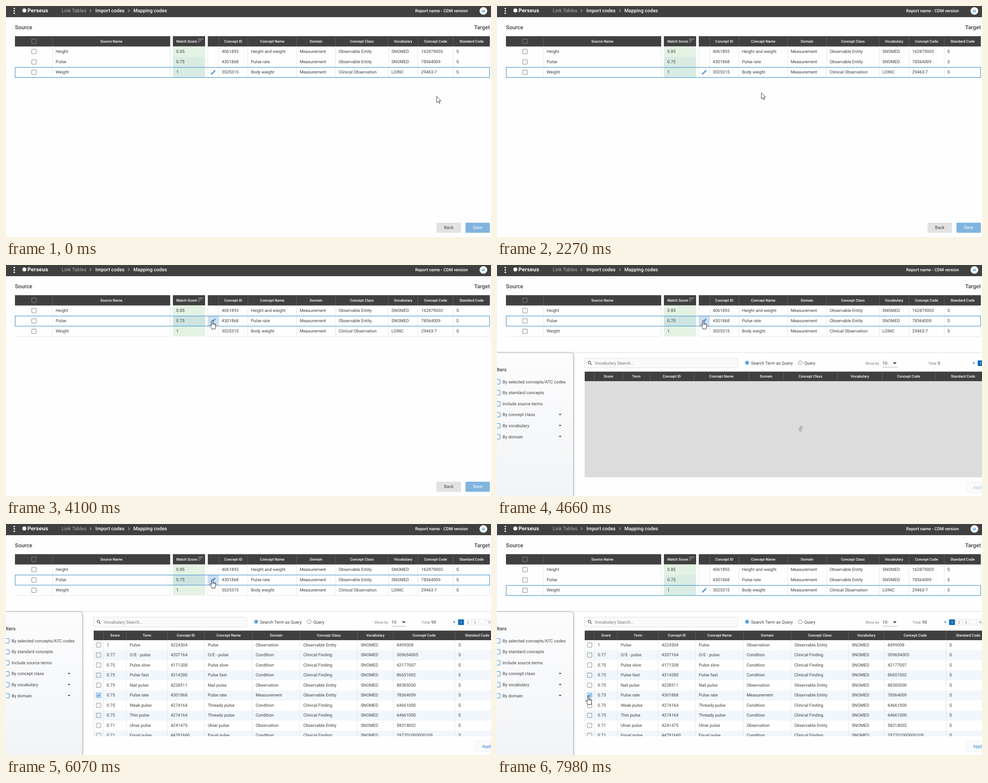
Write an HTML page that moves like this. It is 1084 by 517 pixels and loops after 8 s.

```html
<!DOCTYPE html>
<html lang="en">
<head>
<meta charset="utf-8">
<title>Mapping codes</title>
<style>
html, body { margin: 0; width: 100%; height: 100%; overflow: hidden; background: #fefefe; }
svg { display: block; width: 1084px; height: 517px; }
text { font: 9.58px Roboto, sans-serif; fill: #404040; text-rendering: geometricPrecision; }
.head { font-size: 8.2px; font-weight: 500; fill: #fff; text-anchor: middle; }
.crumb { font-size: 10.95px; font-weight: 500; fill: #fff; }
.title { font-size: 12.3px; font-weight: 500; }
.small { font-size: 8.2px; fill: #777; }
.page { font-size: 8.2px; fill: #777; text-anchor: middle; }
.mid { text-anchor: middle; }
.end { text-anchor: end; }
</style>
</head>
<body>
<script>
const DARK = '#404040', BLUE = '#1976c5', ZEBRA = '#f1f7fc';

const text = (x, y, s, cls = '', extra = '') => `<text x="${x}" y="${y}" class="${cls}" ${extra}>${s}</text>`;
const rect = (x, y, w, h, fill = 'none', extra = '') =>
  `<rect x="${x}" y="${y}" width="${w}" height="${h}" fill="${fill}" ${extra}/>`;
const path = (d, fill = 'none', extra = '') => `<path d="${d}" fill="${fill}" ${extra}/>`;
const box = (x, y, color = '#808080', fill = 'none') =>
  rect(x - 5, y - 5, 10, 10, fill, `stroke="${color}" rx=".5"`);
const vlines = (xs, y1, y2, color) =>
  path(xs.map(x => `M${x} ${y1}V${y2}`).join(''), 'none', `stroke="${color}"`);

// Top bar
const topBar = rect(0, 0, 1084, 25, DARK) +
  [5.6, 10.9, 16.2].map(y => `<circle cx="18.5" cy="${y}" r="1.7" fill="#fff"/>`).join('') +
  '<circle cx="41" cy="10" r="4.5" fill="#fff"/>' +
  text(48, 14, 'Perseus', '', 'style="font:700 11.6px Inter,sans-serif;fill:#fff"') +
  text(124.5, 14, 'Link Tables', 'crumb', 'style="fill:#9b9b9b"') +
  text(199.8, 14, 'Import codes', 'crumb') + text(284.7, 14, 'Mapping codes', 'crumb') +
  path('M187.5 7.5l3 3-3 3M273 7.5l3 3-3 3', 'none', 'stroke="#b5b5b5" stroke-width="1.2"') +
  text(914.6, 14, 'Report name - CDM version', '', 'style="font-weight:500;fill:#fff"') +
  '<circle cx="1067" cy="11" r="8.6" fill="#fff"/>' +
  text(1067, 14, 'IA', 'mid', `style="font-size:8px;font-weight:500;fill:${BLUE}"`);

// Mapping table
const mapLines = [475.5, 540.5, 649.5, 736.5, 854.5, 920.5, 999.5];
const mapHeads = [[235.5, 'Source Name'], [403.8, 'Match Score'], [508, 'Concept ID'], [595, 'Concept Name'],
  [693, 'Domain'], [795.5, 'Concept Class'], [887.5, 'Vocabulary'], [960, 'Concept Code'], [1040.5, 'Standard Code']];
const mapCols = [111, 380.5, 482.3, 547.5, 656.4, 743.5, 861.5, 928, 1006.5];
const mapRows = [
  'Height|0.85|4061893|Height and weight|Measurement|Observable Entity|SNOMED|162879003|S',
  'Pulse|0.75|4301868|Pulse rate|Measurement|Observable Entity|SNOMED|78564009|S',
  'Weight|1|3025315|Body weight|Measurement|Clinical Observation|LOINC|29463-7|S'];
const rowTop = i => 90.6 + 23.2 * i;

const rowFills = mapRows.map((_, i) => {
  const y = rowTop(i);
  return `<g class="row">${rect(20, y, 347, 23.2)}${rect(451, y, 630.5, 23.2)}</g>` +
    rect(373, y, 72, 23.2, '#fff', 'class="score"');
}).join('');
const rowTexts = mapRows.map((row, i) => {
  const y = rowTop(i) + 11.4;
  return box(62.5, y) + row.split('|').map((s, c) => text(mapCols[c], y + 2.6, s)).join('');
}).join('');
const mapTable = text(20, 52, 'Source', 'title') + text(1081.5, 52, 'Target', 'title end') +
  [[20, 347], [373, 72], [451, 630.5]].map(([x, w]) => rect(x, 67.5, w, 23.1, DARK)).join('') +
  vlines([104, ...mapLines], 67.5, 90.6, '#626262') + box(62.5, 79, '#8c8c8c') +
  path('M429 74H441M429 77.6H437M429 81.2H433', 'none', 'stroke="#a2a2a2" stroke-width="1.3"') +
  mapHeads.map(([x, s]) => text(x, 81.6, s, 'head')).join('') +
  rowFills +
  rect(451, rowTop(1), 24, 23.2, '#cadff3', 'id="cell"') +
  vlines([104, 367, 451, ...mapLines, 1081], 90.6, 160.2, '#e3e6e8') +
  path('M20 160.2H367M451 160.2H1081', 'none', 'stroke="#e3e6e8"') +
  rowTexts +
  `<g id="active">${rect(20.5, .4, 1060.3, 22.6, 'none', 'stroke="#2482c8"')}` +
  path('M14.06 9.02l.92.92L5.92 19H5v-.92l9.06-9.06M17.66 3c-.25 0-.51.1-.7.29l-1.83 1.83 3.75 3.75 1.83-1.83' +
    'c.39-.39.39-1.02 0-1.41l-2.34-2.34c-.2-.2-.45-.29-.71-.29zm-3.6 3.19L3 17.25V21h3.75L17.81 9.94z',
    BLUE, 'transform="translate(456.6 4.6) scale(.56)"') + '</g>';

const buttons = rect(962, 485, 55, 22.5, '#e2e2e2', 'rx="1.5"') + text(989.5, 499.3, 'Back', 'mid') +
  rect(1027, 485, 54.5, 22.5, '#80b4de', 'rx="1.5"') +
  text(1054.2, 499.3, 'Save', 'mid', 'style="fill:#fff;font-size:10px"');

// Search panel
const down = (x, y, r) => path(`M${x - r} ${y}h${2 * r}l${-r} ${r}z`, '#333');
const filters = ['selected concepts/ATC codes', 'standard concepts', '', 'concept class', 'vocabulary', 'domain']
  .map((s, i) => {
    const y = 261.4 + 24.6 * i;
    return box(2, y, BLUE, '#fff') + text(12.5, y + 3.2, s ? 'By ' + s : 'Include source terms', '', 'style="font-size:9.65px"') +
      (i > 2 ? down(141, y - 1.8, 3) : '');
  }).join('');

const panelBase = rect(-20, 197, 1130, 340, '#fefefe', 'style="filter:drop-shadow(0 -1px 1.5px #0002)"') +
  rect(-20, 197, 190, 340, 'url(#side)', 'rx="6" style="filter:drop-shadow(1px 0 2px #0006)"') +
  text(21.5, 238, 'Filters', 'crumb end', `style="fill:${DARK}"`) + filters +
  rect(195.5, 208.5, 342.5, 21.5, '#fafafa', 'stroke="#dedede" rx="2.5"') +
  path('M208.8 220.8l2.7 2.7', 'none', 'stroke="#555" stroke-width="1.3"') +
  '<circle cx="206.5" cy="218.2" r="2.8" fill="none" stroke="#555" stroke-width="1.1"/>' +
  text(218.5, 222.7, 'Vocabulary Search...', '', 'style="fill:#777"') +
  `<circle cx="559" cy="218.8" r="4.2" fill="#fff" stroke="${BLUE}"/><circle cx="559" cy="218.8" r="2.5" fill="${BLUE}"/>` +
  '<circle cx="677.8" cy="218.8" r="4.2" fill="#fff" stroke="#777"/>' +
  text(567.8, 223.4, 'Search Term as Query') + text(686.8, 223.4, 'Query') +
  text(823.6, 223, 'Show by', 'small') + text(861.5, 222.8, '10') + down(889, 218, 4) +
  path('M861.5 228.7H895', 'none', 'stroke="#aaa"') +
  rect(1048.5, 486.5, 60, 22.5, '#fafafa', 'stroke="#ededed" rx="2"') +
  text(1064, 501, 'Apply', '', 'id="apply"');

const pager = (x, count, arrow, pages) => text(x, 223, 'Total', 'small') + text(x + 21.5, 222.8, count) +
  path(`M${arrow + 1.5} 216.5v6l-3-3z`, BLUE) +
  pages.map((s, i) => {
    const left = arrow + 9.2 + 15.7 * i, first = !i;
    return rect(left, 213.5, s === '10' ? 15 : 13, 12.5, first ? '#0b66b7' : '#fff', first ? '' : 'stroke="#e2e2e2"') +
      text(left + (s === '10' ? 7.5 : 6.5), 222.5, s, 'page', first ? 'style="fill:#fff"' : '');
  }).join('');

const names = ['Score', 'Term', 'Concept ID', 'Concept Name', 'Domain', 'Concept Class', 'Vocabulary', 'Concept Code', 'Standard Code'];
const tableHead = (lines, centers) => rect(196, 238.6, 890, 21.4, DARK) + vlines(lines, 238.6, 260, '#626262') +
  names.map((s, i) => text(centers[i], 251.8, s, 'head')).join('');

const loading = pager(963.7, '0', 1065.3, ['1']) +
  tableHead([217.5, 281.5, 341.5, 440.5, 563.5, 640.5, 761, 861.5, 980.5],
    [249, 311.5, 390.5, 501.5, 601.5, 700.5, 811, 920, 1041.5]) +
  rect(196, 260, 890, 215, '#dcdcdc') +
  '<circle id="spin" cx="650" cy="356.5" r="30.6" fill="none" stroke="#b9b9b9" stroke-width="7" pathLength="360"/>';

const lines = [217.5, 269, 360.5, 443.5, 550.5, 657, 785.5, 865.5, 1003.5];
const observation = 'Observation|Observable Entity', condition = 'Condition|Clinical Finding';
const results = [
  `1|Pulse|4224504|Pulse|${observation}|8499008`,
  `0.77|O/E - pulse|4207164|O/E - pulse|${condition}|309654005`,
  `0.75|Pulse slow|4171208|Pulse slow|${condition}|42177007`,
  `0.75|Pulse fast|4314280|Pulse fast|${condition}|86651002`,
  `0.75|Nail pulse|4228511|Nail pulse|${observation}|88385000`,
  '0.75|Pulse rate|4301868|Pulse rate|Measurement|Observable Entity|78564009',
  `0.75|Weak pulse|4274164|Thready pulse|${condition}|64661000`,
  `0.75|Thin pulse|4274164|Thready pulse|${condition}|64661000`,
  `0.71|Ulnar pulse|4241475|Ulnar pulse|${observation}|58314002`,
  `0.71|Equal pulse|44791660|Equal pulse|${condition}|297701000000109`
].map((row, i) => {
  const y = 260 + 22.5 * i, cells = row.split('|');
  cells.splice(6, 0, 'SNOMED');
  cells.push('S');
  return rect(196, y, 890, 22.5, i % 2 ? ZEBRA : '#fff') +
    (i === 5 ? box(207, y + 10.8, '#6ba3d3', '#c6ddf1') +
      path(`M204.2 ${y + 11}l2 2.2 4-4.6`, 'none', `stroke="${BLUE}" stroke-width="1.2"`) : box(207, y + 10.8)) +
    cells.map((s, c) => text(lines[c] + 7.4, y + 13.8, s)).join('');
}).join('');

const loaded = pager(928.8, '98', 1001.3, ['1', '2', '3', '...', '10']) +
  tableHead(lines, [243.5, 315, 402, 497.5, 604, 721.5, 825.5, 934.5, 1053]) +
  `<g clip-path="url(#body)">${results}${vlines([196.5, ...lines], 260, 475, '#e3e6e8')}</g>`;

const outline = 'stroke="#222" stroke-linejoin="round"';
document.body.innerHTML = `<svg viewBox="0 0 1084 517">
  <defs>
    <linearGradient id="side" x2="0" y2="1"><stop stop-color="#fcfcfd"/><stop offset="1" stop-color="#f1f4f7"/></linearGradient>
    <clipPath id="body">${rect(196, 260, 890, 215)}</clipPath>
  </defs>
  ${topBar}${mapTable}${buttons}
  <g id="panel">${panelBase}<g id="loading">${loading}</g><g id="loaded">${loaded}</g></g>
  <g id="cursor">
    ${path('M.5.5V14.5L3.8 11.6 6 16.5 8.1 15.6 6 10.8H10.3Z', '#fff', `id="arrow" ${outline} stroke-width=".9"`)}
    ${path('M-1.6 10V1.4Q-1.6 0-.2 0T1.2 1.4V6.5Q3.5 5.7 3.8 7.2 5.9 6.6 6.1 8.2 7.7 8 7.7 9.7V13Q7.7 15.5 6.4 17V19.3H-1.2V17.5' +
      'L-5.2 12.2Q-6 10.4-4.4 10-3 9.8-1.6 12ZM1.2 6.5V10M3.8 7.2V10M6.1 8.2V10.4', '#fff', `id="hand" ${outline}`)}
  </g>
</svg>`;

const $ = id => document.getElementById(id);
const show = (id, on) => $(id).setAttribute('display', on ? 'inline' : 'none');
const rowEls = document.querySelectorAll('.row'), scoreEls = document.querySelectorAll('.score');

// Cursor stops: time, x, y
const stops = [[0, 962, 201.5], [1160, 962, 201.5], [1410, 654, 205], [1560, 654, 205], [1900, 632, 212],
  [2270, 590.5, 193.5], [2370, 576, 193], [2700, 500, 130], [3190, 244, 126], [4000, 455, 123], [4100, 461, 124],
  [6610, 461, 124], [7420, 196.5, 386], [7720, 196.5, 386], [7970, 204, 385], [8000, 204, 385]];

function cursorAt(t) {
  const i = stops.findIndex(s => s[0] > t), [t0, x0, y0] = stops[i - 1], [t1, x1, y1] = stops[i];
  const k = (t - t0) / (t1 - t0);
  return [x0 + (x1 - x0) * k, y0 + (y1 - y0) * k];
}

// cubic-bezier(.35, 0, .25, 1)
function ease(x) {
  let lo = 0, hi = 1, u;
  for (let i = 0; i < 20; i++) {
    u = (lo + hi) / 2;
    const v = 1 - u;
    if (1.05 * u * v * v + .75 * u * u * v + u ** 3 < x) lo = u; else hi = u;
  }
  return u * u * (3 - 2 * u);
}

// The arc grows from its head, then its tail catches up, while the whole ring turns.
function drawSpinner(ms) {
  const phase = Math.floor(ms / 500), e = 270 * ease(ms % 500 / 500), shrink = phase % 2;
  const start = 270 * (phase >> 1) + (shrink ? e : 0);
  $('spin').setAttribute('stroke-dasharray', `${shrink ? 288 - e : 18 + e} 360`);
  $('spin').setAttribute('transform', `rotate(${start + ms * .18} 650 356.5)`);
}

function draw(now) {
  const t = now % 8000, [x, y] = cursorAt(t);
  const active = y < 137 ? 1 : 2, hover = y < 160;
  const onPencil = y < 137 && x > 451 && x < 475, onCheck = x > 201 && x < 213 && y > 377;

  rowEls.forEach((el, i) => {
    const tone = i === active ? (hover ? 2 : 1) : i === 1 ? 1 : 0;
    el.setAttribute('fill', ['#fff', ZEBRA, '#e4eefa'][tone]);
    scoreEls[i].setAttribute('fill', ['#e4f2e4', '#d9ece4', '#cde5e1'][tone]);
  });
  $('active').setAttribute('transform', `translate(0 ${rowTop(active)})`);
  show('cell', onPencil);

  const isLoaded = t >= 6070;
  show('panel', t >= 4660);
  show('loading', !isLoaded);
  show('loaded', isLoaded);
  $('apply').style.fill = isLoaded ? '#2a80c9' : '#9ccaee';
  if (t >= 4660 && !isLoaded) drawSpinner(40 + Math.floor((t - 4660) / 50) * 50);

  $('cursor').setAttribute('transform', `translate(${x} ${y})`);
  show('hand', onPencil || onCheck);
  show('arrow', !onPencil && !onCheck);
  requestAnimationFrame(draw);
}
draw(performance.now());
</script>
</body>
</html>
```
